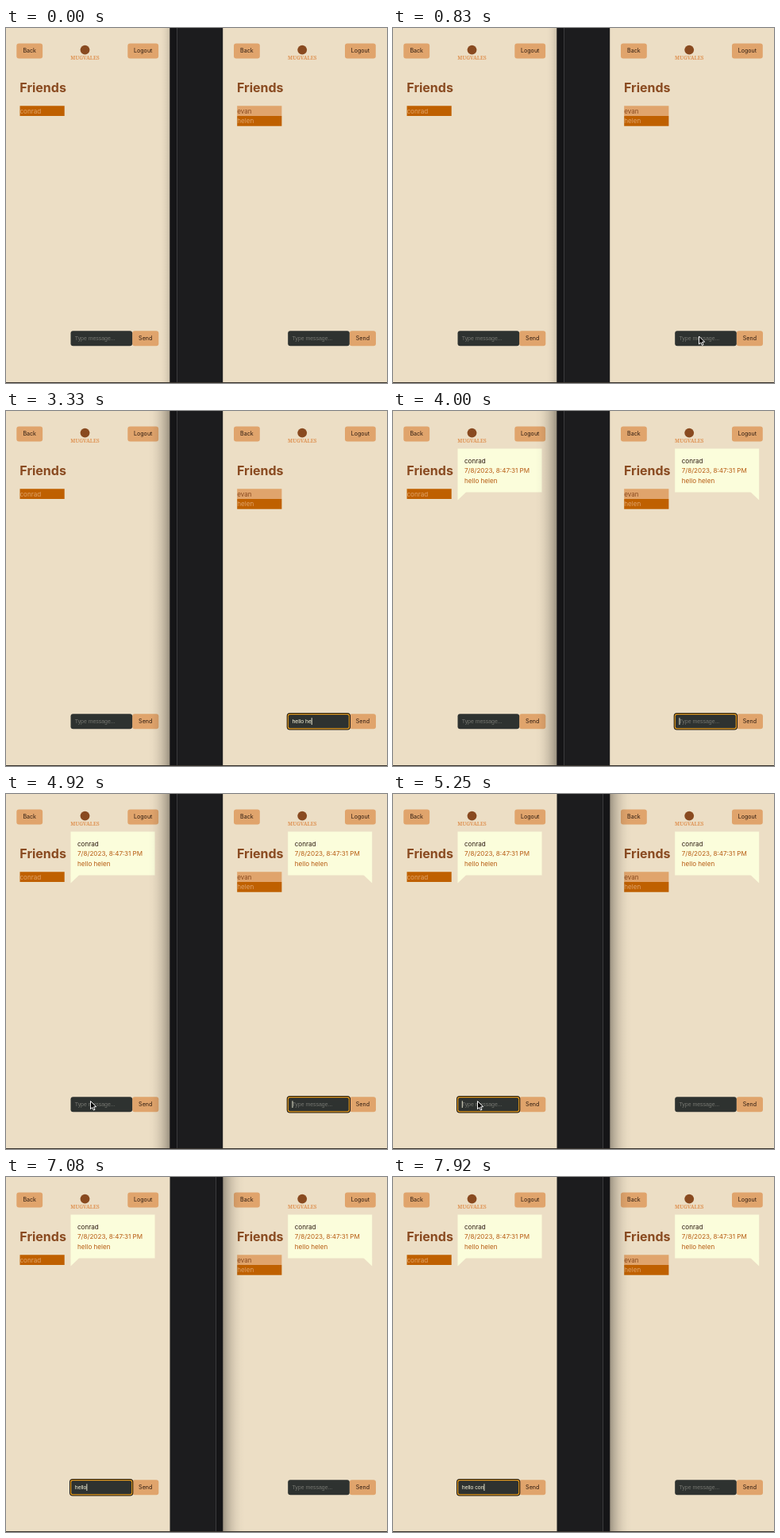
These frames come from a looping animation (480 px wide and 448 px high, 8000 ms). An HTML page with a canvas:

```html
<!DOCTYPE html>
<html lang="en">
<head>
<meta charset="utf-8">
<title>Two-window chat</title>
<style>
  html, body { margin: 0; width: 480px; height: 448px; overflow: hidden; }
  canvas { display: block; }
</style>
</head>
<body>
<canvas id="stage" width="480" height="448"></canvas>
<script>
const ctx = document.getElementById('stage').getContext('2d');
const W = 480, H = 448, LOOP = 8000;
const SANS = 'Inter, sans-serif';
const FIELD = '"Liberation Sans", Arial, sans-serif';
const SERIF = '"Noto Serif", serif';
const C = {
  page: '#ecdec5', button: '#e0a46c', ink: '#2c1a10', brown: '#894a20',
  orange: '#bf6000', field: '#2e3230', hint: '#757670', cream: '#f6f3da',
  bubble: '#fbfddb', message: '#b65a10', dark: '#1c1c1e', ring: '#e59a1c'
};

const SENT = 3920;
const RIGHT_FOCUS = 1000, LEFT_FOCUS = 5080;
const MESSAGE = 'hello helen';
const REPLY = 'hello con';
const messageKeys = [1750, 2000, 2170, 2420, 2670, 2920, 3250, 3330, 3420, 3500, 3750];
const replyKeys = [5580, 5830, 6000, 6170, 6920, 7170, 7500, 7670, 7920];

function rect(x, y, w, h, color, radius = 0) {
  ctx.fillStyle = color;
  ctx.beginPath();
  ctx.roundRect(x, y, w, h, radius);
  ctx.fill();
}

function poly(points, color) {
  ctx.fillStyle = color;
  ctx.beginPath();
  points.forEach(([x, y]) => ctx.lineTo(x, y));
  ctx.closePath();
  ctx.fill();
}

function text(str, x, y, size, color, family = SANS, weight = 400, align = 'left') {
  ctx.font = `${weight} ${size}px ${family}`;
  ctx.textAlign = align;
  ctx.fillStyle = color;
  ctx.fillText(str, x, y);
}

function button(label, x, y, w) {
  rect(x, y, w, 19, C.button, 3);
  text(label, x + w / 2, y + 12, 7.1, C.ink, SANS, 400, 'center');
}

function friend(name, row, active) {
  const y = 98.3 + row * 12.7;
  rect(17.5, y, 56.2, 12.7, active ? C.orange : C.button);
  text(name, 17.5, y + 9.4, 8.1, active ? C.button : C.brown);
}

function bubble(tailRight) {
  rect(81.5, 47.5, 106, 55, C.bubble);
  const edge = tailRight ? 187.5 : 81.5;
  const inner = tailRight ? 176.5 : 92.5;
  poly([[edge, 102], [inner, 102], [edge, 112.5]], C.bubble);
  text('conrad', 90, 65.8, 8.1, C.ink);
  text('7/8/2023, 8:47:31 PM', 90, 78.3, 8.1, C.message);
  text(MESSAGE, 90, 90.8, 8.1, C.message);
}

function input(value, focused, caretOn) {
  if (focused) {
    rect(80, 381, 80.3, 21.5, '#16120c', 4);
    rect(81, 382, 78.3, 19.5, C.ring, 3);
    rect(82.2, 383.2, 75.9, 17.1, C.field, 2);
  } else {
    rect(81.5, 382.3, 77.6, 19, C.field, 3);
  }
  if (value) text(value, 86.8, 394.3, 6.93, C.cream, FIELD);
  else text('Type message...', 86.8, 394.3, 6.93, C.hint, FIELD);
  if (focused && caretOn) {
    ctx.font = `6.93px ${FIELD}`;
    rect(86.8 + ctx.measureText(value).width, 387.3, 0.9, 8.7, C.cream);
  }
}

function pane(x, friends, sent, tailRight, field) {
  ctx.save();
  ctx.translate(x, 0);
  button('Back', 13.3, 19.4, 32.8);
  button('Logout', 153.3, 19.4, 38.8);
  ctx.fillStyle = C.brown;
  ctx.beginPath();
  ctx.arc(99.5, 27.6, 5.9, 0, Math.PI * 2);
  ctx.fill();
  text('MUGVALES', 99.6, 40.2, 6.4, '#df9455', SERIF, 700, 'center');
  text('Friends', 17.3, 80.5, 16, C.brown, SANS, 700);
  friends.forEach((name, i) => friend(name, i, i === friends.length - 1));
  if (sent) bubble(tailRight);
  button('Send', 159.1, 382.3, 33.2);
  input(field.value, field.focused, field.caretOn);
  ctx.restore();
}

// Soft window shadow that fades from one edge outwards.
function shadow(from, to, alpha) {
  const g = ctx.createLinearGradient(from, 0, to, 0);
  for (let i = 0; i <= 5; i++) {
    const k = i / 5;
    g.addColorStop(k, `rgba(20,18,14,${alpha * (1 - k) ** 2})`);
  }
  ctx.fillStyle = g;
  ctx.fillRect(Math.min(from, to), 0, Math.abs(to - from), H);
}

function gap(front, focused) {
  rect(206.5, 0, 66.7, H, C.dark);
  if (front === 'right') {
    rect(206.5, 0, 8.5, H, '#151517');
    rect(215, 0, 1, H, '#3b3b3d');
    shadow(206.5, focused ? 179 : 193, focused ? 0.38 : 0.16);
  } else {
    rect(265, 0, 8.2, H, '#151517');
    rect(264, 0, 1, H, '#3b3b3d');
    shadow(273.2, 301, 0.36);
  }
}

// Typed value so far, with a caret that restarts its blink at each key.
function fieldState(t, start, end, str, keys, submit = Infinity) {
  if (t < start || t >= end) return { value: '', focused: false, caretOn: false };
  const pressed = keys.filter(k => k <= t);
  const cleared = t >= submit;
  const since = cleared ? submit : pressed.length ? pressed[pressed.length - 1] : start;
  return {
    value: cleared ? '' : str.slice(0, pressed.length),
    focused: true,
    caretOn: Math.floor((t - since) / 500) % 2 === 0
  };
}

function glide(t, t0, t1, a, b) {
  const p = Math.min(1, Math.max(0, (t - t0) / (t1 - t0)));
  const e = p * p * (3 - 2 * p);
  return a.map((v, i) => v + (b[i] - v) * e);
}

function pointer(t) {
  const home = [385.5, 389], target = [106.5, 387.6];
  let at;
  if (t >= 400 && t < messageKeys[0]) at = glide(t, 400, 830, [345, 320], home);
  else if (t >= 4250 && t < replyKeys[0]) at = glide(t, 4250, 4850, home, target);
  else return;
  ctx.save();
  ctx.translate(...at);
  ctx.beginPath();
  [[0, 0], [0, 10], [2.3, 7.9], [3.9, 11.4], [5.5, 10.7], [4, 7.3], [7.1, 7.1]]
    .forEach(([x, y]) => ctx.lineTo(x, y));
  ctx.closePath();
  ctx.fillStyle = '#000';
  ctx.strokeStyle = '#fff';
  ctx.lineWidth = 1;
  ctx.lineJoin = 'round';
  ctx.fill();
  ctx.stroke();
  ctx.restore();
}

function draw(t) {
  const sent = t >= SENT;
  const right = fieldState(t, RIGHT_FOCUS, LEFT_FOCUS, MESSAGE, messageKeys, SENT);
  const left = fieldState(t, LEFT_FOCUS, LOOP, REPLY, replyKeys);
  rect(0, 0, W, H, C.page);
  pane(0, ['conrad'], sent, false, left);
  pane(273.7, ['evan', 'helen'], sent, true, right);
  gap(left.focused ? 'left' : 'right', right.focused);
  rect(0, 447, W, 1, '#38332d');
  pointer(t);
}

const begin = performance.now();
function tick() {
  draw((performance.now() - begin) % LOOP);
  requestAnimationFrame(tick);
}
tick();
</script>
</body>
</html>
```
